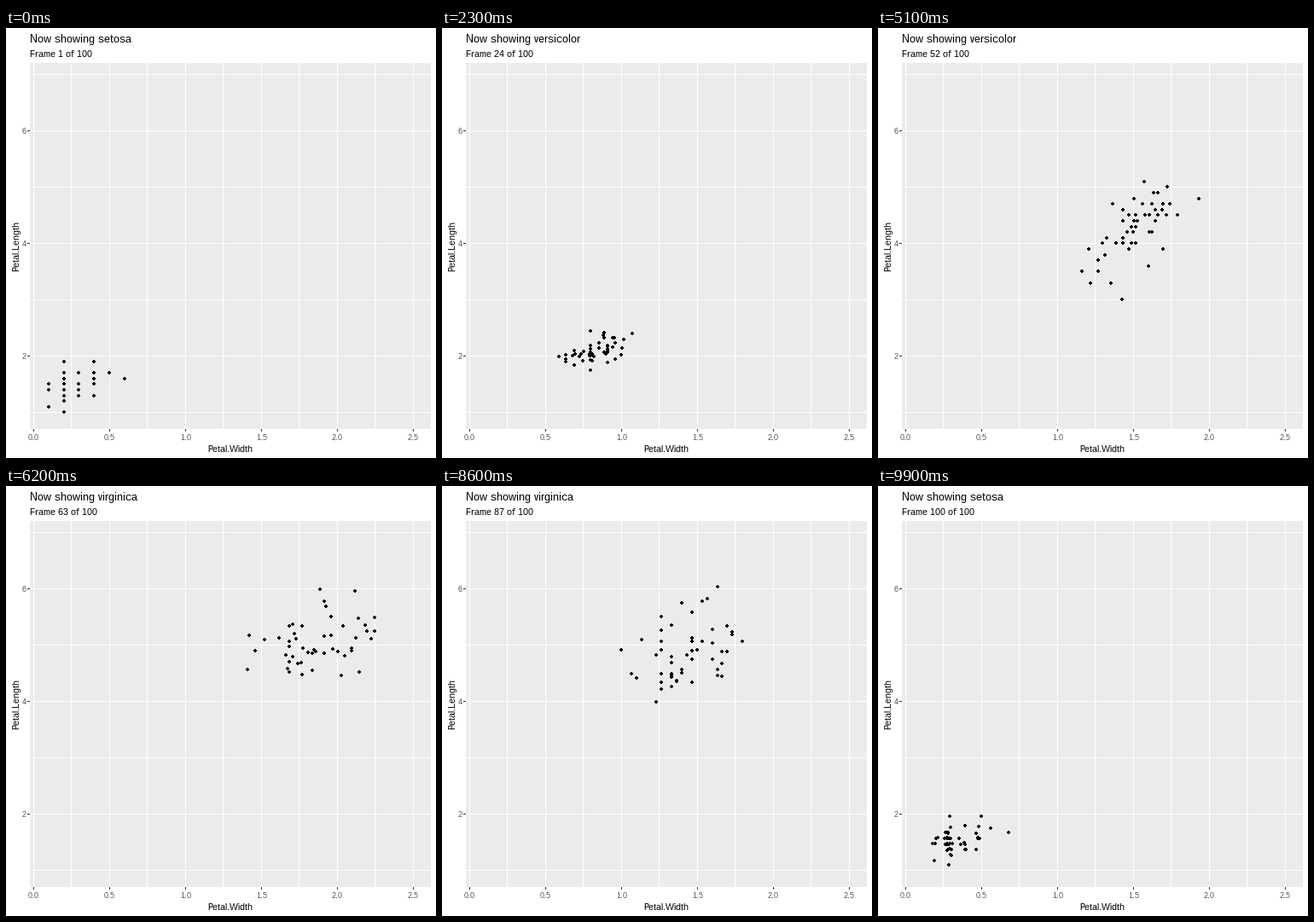
Animation, 504 px wide and 504 px high, one loop 10000 ms. Source, as a matplotlib script:

```python
import numpy as np
import matplotlib.pyplot as plt
from matplotlib.animation import FuncAnimation
from matplotlib.collections import PolyCollection
from matplotlib.patches import Rectangle

plt.rcParams.update({
    "font.family": "Liberation Sans",
    "text.hinting": "native",
    "text.hinting_factor": 1,
    "toolbar": "None",
})

SIZE, FRAMES, INTERVAL = 504, 100, 100
LEFT, TOP, RIGHT, BOTTOM = 28, 41, 498, 470

# Petal measurements in tenths, one row order shared by all species.
SETOSA_LENGTH = [
    14, 14, 13, 15, 14, 17, 14, 15, 14, 15, 15, 16, 14, 11, 12, 15, 13,
    14, 17, 15, 17, 15, 10, 17, 19, 16, 16, 15, 14, 16, 16, 15, 15, 14,
    15, 12, 13, 14, 13, 15, 13, 13, 13, 16, 19, 14, 16, 14, 15, 14]
SETOSA_WIDTH = [
    2, 2, 2, 2, 2, 4, 3, 2, 2, 1, 2, 2, 1, 1, 2, 4, 4,
    3, 3, 3, 2, 4, 2, 5, 2, 2, 4, 2, 2, 2, 2, 4, 1, 2,
    2, 2, 2, 1, 2, 2, 3, 3, 2, 6, 4, 3, 2, 2, 2, 2]
VERSICOLOR_LENGTH = [
    47, 45, 49, 40, 46, 45, 47, 33, 46, 39, 35, 42, 40, 47, 36, 44, 45,
    41, 45, 39, 48, 40, 49, 47, 43, 44, 48, 50, 45, 35, 38, 37, 39, 51,
    45, 45, 47, 44, 41, 40, 44, 46, 40, 33, 42, 42, 42, 43, 30, 41]
VERSICOLOR_WIDTH = [
    14, 15, 15, 13, 15, 13, 16, 10, 13, 14, 10, 15, 10, 14, 13, 14, 15,
    10, 15, 11, 18, 13, 15, 12, 13, 14, 14, 17, 15, 10, 11, 10, 12, 16,
    15, 16, 15, 13, 13, 13, 12, 14, 12, 10, 13, 12, 13, 13, 11, 13]
VIRGINICA_LENGTH = [
    60, 51, 59, 56, 58, 66, 45, 63, 58, 61, 51, 53, 55, 50, 51, 53, 55,
    67, 69, 50, 57, 49, 67, 49, 57, 60, 48, 49, 56, 58, 61, 64, 56, 51,
    56, 61, 56, 55, 48, 54, 56, 51, 51, 59, 57, 52, 50, 52, 54, 51]
VIRGINICA_WIDTH = [
    25, 19, 21, 18, 22, 21, 17, 18, 18, 25, 20, 19, 21, 20, 24, 23, 18,
    22, 23, 15, 23, 20, 20, 18, 21, 18, 18, 18, 21, 16, 19, 20, 22, 15,
    14, 23, 24, 18, 18, 21, 24, 23, 19, 23, 25, 23, 19, 20, 23, 18]

STATES = [
    ("setosa", SETOSA_WIDTH, SETOSA_LENGTH),
    ("versicolor", VERSICOLOR_WIDTH, VERSICOLOR_LENGTH),
    ("virginica", VIRGINICA_WIDTH, VIRGINICA_LENGTH),
]
STATES = [(name, np.array(w) / 10, np.array(l) / 10) for name, w, l in STATES]
MOVES = [(11, 33), (45, 67), (79, 100)]  # first and last frame of each move

# A 4 x 4 pixel dot without its corners.
DOT = np.array([(-1, -2), (1, -2), (1, -1), (2, -1), (2, 1), (1, 1),
                (1, 2), (-1, 2), (-1, 1), (-2, 1), (-2, -1), (-1, -1)])


def px(v):
    return np.floor(28.9 + 177.9 * (v + 0.02) + 1e-6)


def py(v):
    return np.floor(470.3 - 66 * (v - 0.705) + 1e-6)


def bounce_out(t):
    if t < 4 / 11:
        return 121 * t * t / 16
    if t < 8 / 11:
        return 363 / 40 * t * t - 99 / 10 * t + 17 / 5
    if t < 9 / 10:
        return 4356 / 361 * t * t - 35442 / 1805 * t + 16061 / 1805
    return 54 / 5 * t * t - 513 / 25 * t + 268 / 25


def bounce_in(t):
    return 1 - bounce_out(1 - t)


def pose(frame):
    """Species shown, widths and lengths at a frame."""
    for i, (start, end) in enumerate(MOVES):
        if frame < end:
            break
    t = max(0, (frame - start) / (end - start))
    a, b = STATES[i], STATES[(i + 1) % 3]
    width = a[1] + (b[1] - a[1]) * t
    length = a[2] + (b[2] - a[2]) * bounce_in(t)
    return (b if t > 0.5 else a)[0], width, length


fig = plt.figure(figsize=(SIZE / 72, SIZE / 72), dpi=72, facecolor="white")
ax = fig.add_axes([0, 0, 1, 1])
ax.set_xlim(0, SIZE)
ax.set_ylim(SIZE, 0)
ax.axis("off")


def box(x, y, w, h, color):
    ax.add_patch(Rectangle((x, y), w, h, fc=color, ec="none", lw=0,
                           antialiased=False))


def label(x, y, s, size, color="black", **kw):
    return ax.text(x, y, s, fontsize=size, color=color, va="baseline", **kw)


box(LEFT, TOP, RIGHT - LEFT, BOTTOM - TOP, "#EBEBEB")
for v in np.arange(11) / 4:
    box(px(v), TOP, 1, BOTTOM - TOP, "white")
for v in range(1, 8):
    box(LEFT, py(v), RIGHT - LEFT, 1, "white")
for v in np.arange(6) / 2:
    box(px(v), BOTTOM, 1, 3, "#333333")
    label(px(v) + 0.5, 483, f"{v:.1f}", 9, "#4D4D4D", ha="center")
for v in (2, 4, 6):
    box(LEFT - 3, py(v), 3, 1, "#333333")
    label(24, py(v) + 4, str(v), 9, "#4D4D4D", ha="right")

label(263, 497, "Petal.Width", 11, ha="center")
ax.text(15, 255.5, "Petal.Length", fontsize=11, rotation=90,
        rotation_mode="anchor", ha="center", va="baseline")
title = label(28, 17, "", 13)
subtitle = label(28, 34, "", 11)
dots = ax.add_collection(
    PolyCollection([], facecolors="black", edgecolors="none", linewidths=0,
                   antialiaseds=False, zorder=3), autolim=False)


def update(frame):
    name, width, length = pose(frame)
    centres = np.column_stack([px(width), py(length)])
    dots.set_verts(centres[:, None, :] + DOT)
    title.set_text(f"Now showing {name}")
    subtitle.set_text(f"Frame {frame + 1} of {FRAMES}")
    return dots, title, subtitle


anim = FuncAnimation(fig, update, frames=FRAMES, interval=INTERVAL,
                     init_func=lambda: update(0), repeat=True, repeat_delay=0)
plt.show()
```
